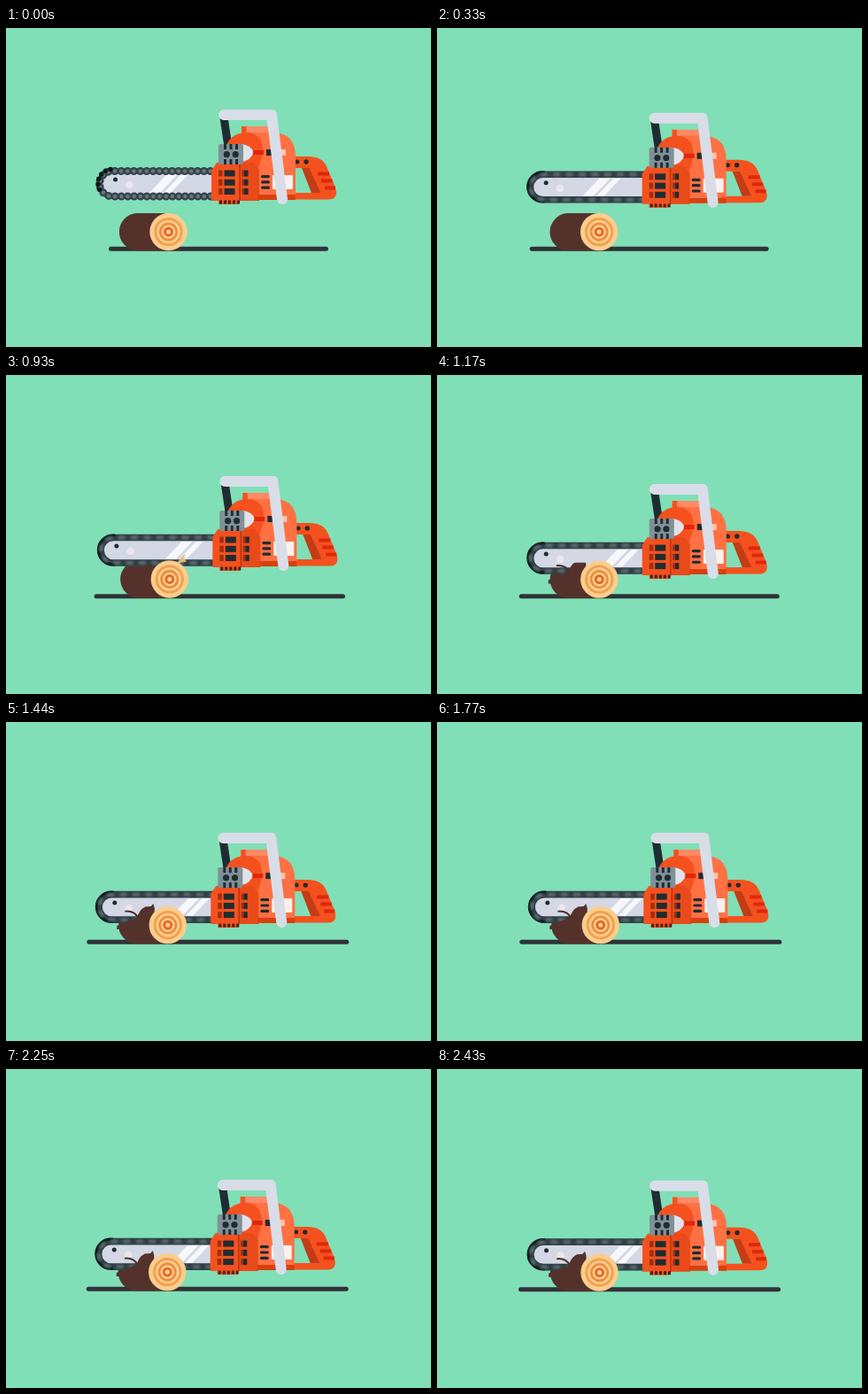
Animation of 480 by 360 pixels, one loop 2.46 s. Source, as an HTML page with a canvas:

```html
<!DOCTYPE html>
<html lang="en">
<head>
<meta charset="utf-8">
<title>Chainsaw</title>
<style>
html, body { margin: 0; width: 100%; height: 100%; overflow: hidden; background: #80dfb6; }
canvas { display: block; }
</style>
</head>
<body>
<canvas id="stage" width="480" height="360"></canvas>
<script>
const ctx = document.getElementById('stage').getContext('2d');
const LOOP = 2460, STEP = 30;
const DARK = '#1f2c32', RED = '#f4511e', CORAL = '#ff7043', DEEP = '#e0260f', BROWN = '#54322b';

// [time, value] keys
const DROP = [[0, 0], [210, -4], [510, 18], [870, 20], [1110, 30], [1400, 34]];
const GROUND = [[0, 124], [540, 140.5], [870, 141], [1140, 147], [1400, 148]];

const clamp = v => Math.max(0, Math.min(1, v));
const smooth = v => { v = clamp(v); return v * v * (3 - 2 * v); };

function keyed(keys, t) {
  for (let i = 1; i < keys.length; i++) {
    const [t0, a] = keys[i - 1], [t1, b] = keys[i];
    if (t < t1) return a + (b - a) * smooth((t - t0) / (t1 - t0));
  }
  return keys[keys.length - 1][1];
}

function fill(color, path) {
  ctx.fillStyle = color;
  ctx.fill(new Path2D(path));
}

function stroke(color, width, path, cap = 'butt') {
  ctx.strokeStyle = color;
  ctx.lineWidth = width;
  ctx.lineCap = cap;
  ctx.lineJoin = 'round';
  ctx.stroke(path instanceof Path2D ? path : new Path2D(path));
}

function rect(color, x, y, w, h, r = 0) {
  ctx.fillStyle = color;
  ctx.beginPath();
  ctx.roundRect(x, y, w, h, r);
  ctx.fill();
}

function dot(color, x, y, r) {
  ctx.fillStyle = color;
  ctx.beginPath();
  ctx.arc(x, y, r, 0, Math.PI * 2);
  ctx.fill();
}

function ring(color, x, y, r, width) {
  ctx.beginPath();
  ctx.arc(x, y, r, 0, Math.PI * 2);
  ctx.strokeStyle = color;
  ctx.lineWidth = width;
  ctx.stroke();
}

function drawBar(shift) {
  ctx.save();
  ctx.clip(new Path2D('M236 163H120A12.5 12.5 0 0 0 120 188.5H236Z'));
  rect('#d3d8e4', 104, 160, 134, 32);
  ctx.translate(shift, 0);
  fill('#f7f8fc', 'M162 186L181 166H193L174 186ZM178 186L197 166H205L186 186Z');
  ctx.restore();
  dot('#ece6ee', 139.3, 177, 4.3);
  dot(DARK, 123.5, 171, 2.5);
}

const chainPath = new Path2D('M238 161.5H120A14.2 14.2 0 0 0 120 190H238');

function drawChain(t, speed) {
  ctx.save();
  ctx.lineDashOffset = -t * 0.19 * speed;
  if (speed < 0.35) {
    stroke('#2f3d42', 6, chainPath);
    ctx.setLineDash([0, 7.2]);
    stroke('#35444a', 9, chainPath, 'round');
    stroke('#66777a', 4.5, chainPath, 'round');
    ctx.setLineDash([0, 6]);
    stroke('#101719', 5.5, 'M118 159.5A16 16 0 0 0 108 186', 'round');
  } else {
    ctx.filter = 'blur(0.6px)';
    stroke('#2f3e44', 7.6, chainPath);
    stroke('#131c20', 3, 'M122 159H119.5A16 16 0 0 0 119.5 192H122');
    ctx.filter = 'blur(1.4px)';
    ctx.setLineDash([8, 6.4]);
    stroke('#64767a', 3.4, chainPath);
  }
  ctx.restore();
}

function drawRearHandle() {
  ctx.fillStyle = RED;
  ctx.fill(new Path2D('M320 145H341Q357 145 362 156L372 180Q376 193.5 364 193.5H320ZM326 158V186H355L342 158Z'), 'evenodd');
  fill('#c33c16', 'M334 158H342.5L355.5 186H345Z');
  stroke(DEEP, 4, 'M352 164.5H365M356 172.5H368.5M360 180.5H372');
  dot(DARK, 339, 151, 2.7);
  dot(DARK, 328.8, 151, 2.5);
}

function drawMotor() {
  stroke(DARK, 9, 'M246 101L251 134');
  rect('#ff8a65', 266, 111, 34, 12);
  rect(RED, 266, 111, 5.5, 12);

  fill(RED, 'M247 165V138Q252 118 272 118H300V165Z');
  fill(CORAL, 'M275 118H304Q327 120 327 145V188H285V158Q293 140 288 127Q284 120 275 118Z');
  fill('#e0e3eb', 'M266 131Q276 132 280 140Q276 150 266 151Z');
  rect(DEEP, 279, 138, 12, 5);
  rect(DARK, 294, 137, 7, 7);
  rect('#ffc4b2', 301, 137, 15, 7);

  fill(RED, 'M232 161L238 152H264V195H232Z');
  fill('#e94a19', 'M264 152H279L286 160V195H264Z');
  rect('#d9400f', 285, 188, 42, 6);
  stroke('#b8350f', 1.5, 'M264 153V195');

  for (const y of [160.5, 170.8, 181]) {
    rect(DARK, 246.5, y, 12, 7);
    rect('#9c2f13', 240, y, 4.5, 7);
    rect(DARK, 269, y, 4.5, 7);
    rect('#9c2f13', 266.5, y, 2.5, 7);
  }
  for (const y of [166, 172.3, 178.6]) rect(DARK, 288, y, 10, 3.2, 1.5);
  rect('#fff0ec', 301, 166, 23, 16, 1);

  rect(RED, 240, 195, 22, 4);
  for (let x = 241; x < 262; x += 5) rect('#4a2018', x, 194.5, 3, 4);

  rect('#7f9097', 240, 131, 28, 23, 2);
  for (const x of [246, 252.5, 259]) {
    rect(DARK, x, 131, 3, 6);
    rect(DARK, x, 148, 3, 6);
  }
  dot(DARK, 249.3, 142.7, 3.6);
  dot(DARK, 259.2, 142.7, 3.6);

  stroke('#d9dde8', 12, 'M246 98H300L312 193', 'round');
}

function drawSaw(t, drop) {
  ctx.save();
  ctx.translate(0, drop);
  drawBar(Math.max(0, drop) * 0.75);
  drawChain(t, smooth(t / 420));
  drawRearHandle();
  drawMotor();
  ctx.restore();
}

function drawLogEnd(t) {
  const split = smooth((t - 960) / 330);
  if (split > 0) {
    ctx.save();
    ctx.beginPath();
    ctx.rect(120, 230 - 27 * split, 60, 50);
    ctx.clip();
    fill(BROWN, 'M126 231Q138 226 149 221.5Q151 213 158 209.5L164.5 209L167 206L168.5 211V235H126Z');
    stroke('#4b302c', 2, 'M136 214.5Q146 214 150 222', 'round');
    ctx.restore();
  }

  const chip = clamp((t - 870) / 150);
  if (chip > 0 && chip < 1) {
    ctx.save();
    ctx.translate(198 + (chip - 0.4) * 10, 207 - (chip - 0.4) * 9);
    ctx.globalAlpha = Math.sin(chip * Math.PI);
    fill('#e9bd76', 'M-6 5L-2 -1L3 -6L2 0L5 3Z');
    ctx.restore();
  }

  dot('#fbcd8c', 183.5, 230, 21.2);
  ring('#f0a050', 183.5, 230, 14.7, 2.8);
  ring('#ec8d42', 183.5, 230, 9.2, 2.8);
  ring('#e2662a', 183.5, 230, 4, 2.8);
}

function draw(now) {
  const t = Math.floor((now % LOOP) / STEP) * STEP;
  const n = t / STEP;
  const shake = smooth(t / 400);
  const wave = (peak, period) => Math.cos((n - peak) / period * Math.PI * 2);
  const half = keyed(GROUND, t);

  ctx.fillStyle = '#80dfb6';
  ctx.fillRect(0, 0, 480, 360);
  ctx.save();
  ctx.translate(1.3 * shake * wave(31, 4.65), -0.9 * shake * wave(58.9, 2.7));
  rect('#2f3236', 240 - half, 246.7, half * 2, 5, 2.5);
  fill(BROWN, 'M184 209H147A21.2 21.2 0 0 0 147 251.2H184Z');
  drawSaw(t, keyed(DROP, t));
  drawLogEnd(t);
  ctx.restore();
}

const start = performance.now();
function tick() {
  draw(performance.now() - start);
  requestAnimationFrame(tick);
}
tick();
</script>
</body>
</html>
```
